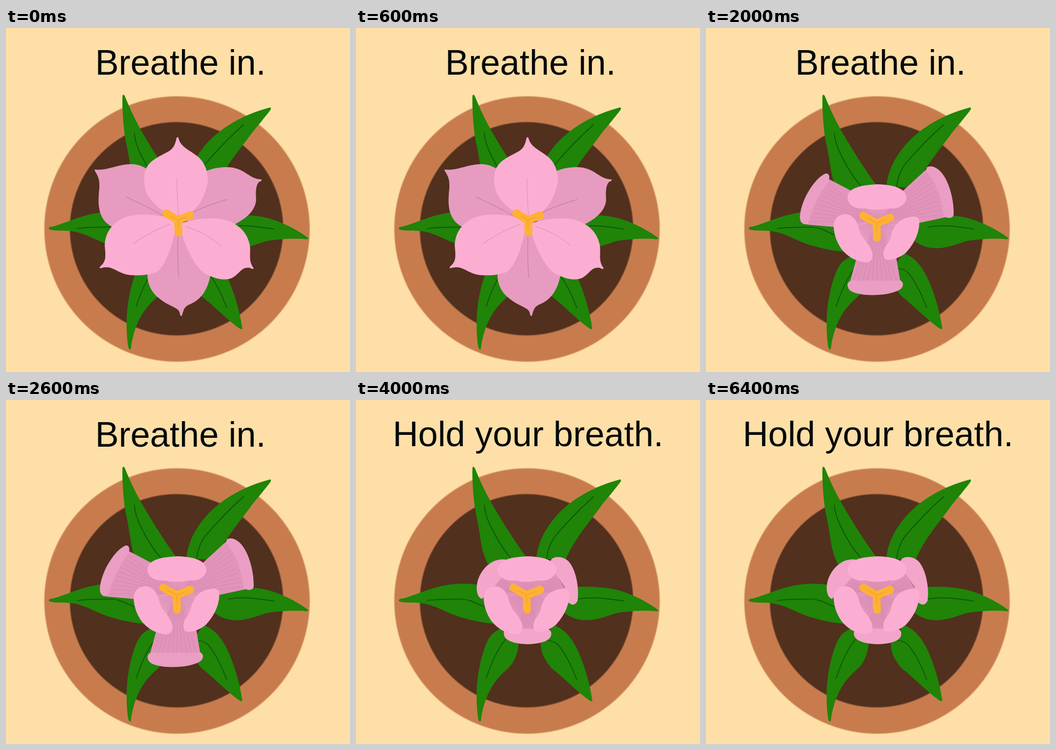
These frames come from a looping animation (700x700 px, 8000 ms). An HTML page with a canvas:

```html
<!DOCTYPE html>
<html lang="en">
<head>
<meta charset="utf-8">
<title>Breathing flower</title>
<style>
html, body { margin: 0; width: 100%; height: 100%; overflow: hidden; background: #fddfa7; }
canvas { display: block; width: 700px; height: 700px; }
</style>
</head>
<body>
<canvas id="stage" width="700" height="700"></canvas>
<script>
const ctx = document.getElementById("stage").getContext("2d");
const LOOP = 8000;
const STEP = 1000;

const color = {
  sky: "#fddfa7", pot: "#c87c4d", soil: "#51301d", leaf: "#1f8408", leafVein: "#0e5208",
  front: "#fcaed2", frontVein: "#e297bd", back: "#e79bc0", backVein: "#ca80a6",
  rim: "#ea9ec4", bud: "#f3a5ca", inner: "#e294ba", stripe: "#d389b0",
  stamen: "#feb233", stamenLine: "#f79f2b", text: "#060a0a"
};

const leaves = [
  ["M237 138Q239 133 242 139C254 169 267 195 280 217C302 255 324 288 345 318L300 345L268 333C258 312 256 300 252 275C250 262 248 250 245 236C239 210 236 160 237 138Z",
   "M261 214C264 240 273 255 285 278C295 296 304 309 314 320"],
  ["M536 162Q541 161 538 167C525 184 513 198 500 214C478 245 443 284 426 326L367 322C370 292 382 268 400 245C435 200 490 174 536 162Z",
   "M483 197C455 222 430 248 406 276C396 289 390 305 388 323"],
  ["M87 408Q87 404 95 404C125 396 153 380 196 375C225 372 247 374 272 382L290 456C260 454 236 449 210 441C184 433 160 416 130 413C113 412 87 413 87 408Z",
   "M145 408C175 404 190 406 214 405C234 406 246 415 262 421"],
  ["M616 428Q614 431 604 429C577 428 550 430 528 434C500 444 480 451 455 447C440 444 430 438 420 430L440 381C475 379 490 380 520 384C552 390 590 408 616 428Z",
   "M545 409C515 405 484 399 452 405"],
  ["M254 653Q252 657 249 650C245 628 244 590 248 563C253 528 264 486 280 474Q290 466 302 462L331 495C328 530 314 542 302 553C278 574 260 606 254 653Z",
   "M265 566C274 540 284 513 304 487"],
  ["M481 612Q479 615 469 607C445 589 423 565 398 546C383 527 376 515 376 493L402 458C424 466 438 483 450 507C463 535 475 571 481 612Z",
   "M449 569C438 540 426 516 412 499Q405 491 390 489"]
];

const openBack = [
  ["M181 288C205 291 228 277 255 277C283 278 300 294 313 320L352 388L262 412C238 415 213 407 201 393C187 375 187 355 190 325C191 306 186 300 181 291Q179 288 181 288Z",
   "M245 344C270 356 295 367 320 382"],
  ["M520 308Q521 312 515 313C508 320 508 334 509 350C507 372 489 387 468 398C455 404 440 402 420 402L350 390L372 320C387 297 415 283 450 283C487 284 494 308 520 308Z",
   "M450 349C422 357 400 365 376 377"],
  ["M358 585Q355 588 354 582C353 569 338 569 318 555C300 543 290 528 288 508C288 491 291 476 296 463L348 400L405 458C417 474 419 487 416 503C411 530 399 551 377 561C361 567 362 574 358 585Z",
   "M350 423C349 455 349 484 352 508"]
];

const openFront = [
  ["M347 224Q349 220 351 224C355 242 373 248 388 260C403 270 411 291 411 310C407 339 393 367 368 382L350 390C323 377 299 359 287 338C279 316 280 300 285 286C294 266 321 258 334 249C343 242 345 233 347 224Z",
   "M348 307C347 338 350 358 351 382"],
  ["M192 489Q189 488 192 485C204 475 203 465 201 444C201 421 212 402 232 390C253 378 283 377 318 383L346 396C343 425 330 477 308 496C290 503 273 504 255 503C224 500 217 480 192 489Z",
   "M259 439C282 422 309 409 334 399"],
  ["M504 489Q503 492 496 488C479 485 475 501 459 509C443 515 426 510 407 501C385 489 365 445 358 419L350 399C382 389 409 385 440 389C470 396 490 413 496 441C499 460 492 472 504 489Z",
   "M437 443C416 425 396 414 366 404"]
];

const foldedFront = [
  "M288 347C287 327 310 320 348 318C387 319 407 328 408 346C406 360 392 369 372 367C355 371 340 371 323 367C302 369 289 359 288 347Z",
  "M260 408C259 390 267 379 285 379C302 381 309 397 312 411C317 429 331 437 337 453C342 469 336 477 324 477C302 474 288 465 275 449Q262 430 260 408Z",
  "M434 397C436 385 427 382 414 385C400 387 387 396 382 408C376 419 378 427 370 438C360 450 359 463 364 470C374 475 392 469 406 458C423 441 434 417 434 397Z"
];

// Each tube: body, rim and the two ends of its mouth.
const tubes = [
  ["M251 308L297 332L348 392L262 405L205 400Q208 350 251 308Z",
   "M244 296C225 302 194 345 191 384C191 398 200 402 208 398C213 375 227 340 250 312C252 302 251 296 244 296Z",
   [246, 314, 210, 394]],
  ["M448 288L400 332L348 400L432 397L488 385Q492 335 448 288Z",
   "M449 284C456 278 470 283 479 294C496 314 505 353 504 380C502 388 492 388 484 383C480 349 469 315 448 291Z",
   [453, 296, 483, 380]],
  ["M305 473L292 520L396 520L387 466L348 398Z",
   "M288 522C290 512 301 512 312 515C340 511 365 517 394 513C404 517 402 527 395 532C371 547 310 547 293 534Q288 529 288 522Z",
   [299, 515, 388, 515]]
];

const buds = [
  "M310 326C287 319 262 333 250 361C243 378 244 400 256 405L272 390L298 360Z",
  "M396 328C398 317 422 316 434 330C450 350 454 388 451 408C446 419 438 418 431 411L424 380L406 354Z",
  "M301 472C299 486 312 495 348 497C386 496 400 486 397 472Q391 461 380 467Q350 464 312 466Q303 466 301 472Z"
];

const cup = "M292 350L404 350L428 388L376 468L328 470L270 388Z";

function fill(path, paint) {
  ctx.fillStyle = paint;
  ctx.fill(new Path2D(path));
}

function line(path, paint, width) {
  ctx.strokeStyle = paint;
  ctx.lineWidth = width;
  ctx.stroke(new Path2D(path));
}

function veined(parts, paint, veinPaint, width) {
  for (const [shape, vein] of parts) {
    fill(shape, paint);
    line(vein, veinPaint, width);
  }
}

// Disc with a slightly soft edge.
function disc(x, y, r, paint) {
  const edge = ctx.createRadialGradient(x, y, r - 1.5, x, y, r + 1.5);
  edge.addColorStop(0, paint);
  edge.addColorStop(1, paint + "00");
  ctx.fillStyle = edge;
  ctx.beginPath();
  ctx.arc(x, y, r + 2, 0, Math.PI * 2);
  ctx.fill();
}

// Stripes spreading from a point near the centre to a straight mouth.
function fan([x1, y1, x2, y2], count, start = 0.2) {
  const cx = 348, cy = 394;
  ctx.strokeStyle = color.stripe;
  ctx.lineWidth = 1;
  ctx.beginPath();
  for (let i = 0; i <= count; i++) {
    const x = x1 + (x2 - x1) * i / count;
    const y = y1 + (y2 - y1) * i / count;
    ctx.moveTo(cx + (x - cx) * start, cy + (y - cy) * start);
    ctx.lineTo(x, y);
  }
  ctx.stroke();
}

function throat() {
  fan([323, 369, 377, 369], 12);
  fan([311, 404, 332, 434], 8);
  fan([383, 405, 366, 433], 8);
}

function stamen(x, y, ends) {
  const arms = ends.map(([ex, ey]) => `M${x} ${y}L${ex} ${ey}`).join("");
  const core = ends.map(([ex, ey]) =>
    `M${x} ${y}L${x + (ex - x) * 0.65} ${y + (ey - y) * 0.65}`).join("");
  line(arms, color.stamen, 16);
  line(core, color.stamenLine, 1.5);
}

function outerPetals(pose) {
  if (pose > 0) fill(cup, pose < 3 ? color.back : color.inner);
  if (pose < 2) {
    veined(openBack, color.back, color.backVein, 1.4);
  } else if (pose === 2) {
    for (const [body, rim, mouth] of tubes) {
      fill(body, color.inner);
      fan(mouth, 9);
      fill(rim, color.rim);
    }
  } else {
    fan([292, 361, 272, 388], 10);
    fan([405, 358, 426, 388], 10);
    fan([330, 463, 375, 463], 12);
    for (const bud of buds) fill(bud, color.bud);
  }
}

function innerPetals(pose) {
  if (pose === 0) {
    veined(openFront, color.front, color.frontVein, 1.4);
    stamen(350, 391, [[326, 377], [375, 381], [351, 416]]);
  } else {
    throat();
    for (const petal of foldedFront) fill(petal, color.front);
    stamen(347, 397, [[320, 382], [375, 386], [348, 427]]);
  }
}

function caption(words, x, y) {
  ctx.fillStyle = color.text;
  ctx.fillText(words, x, y);
}

function draw(time) {
  const t = time % LOOP;
  const pose = Math.min(3, Math.floor(t / STEP));
  ctx.fillStyle = color.sky;
  ctx.fillRect(0, 0, 700, 700);
  disc(348, 409, 270, color.pot);
  disc(347, 408.5, 217, color.soil);
  veined(leaves, color.leaf, color.leafVein, 1.7);
  outerPetals(pose);
  innerPetals(pose);
  if (t < 4 * STEP) caption("Breathe in.", 355, 95);
  else caption("Hold your breath.", 350, 94);
}

ctx.lineCap = "round";
ctx.lineJoin = "round";
ctx.textAlign = "center";
ctx.font = "71.8px 'Liberation Sans', Arial, sans-serif";

const begin = performance.now();
function tick() {
  draw(performance.now() - begin);
  requestAnimationFrame(tick);
}
tick();
</script>
</body>
</html>
```
